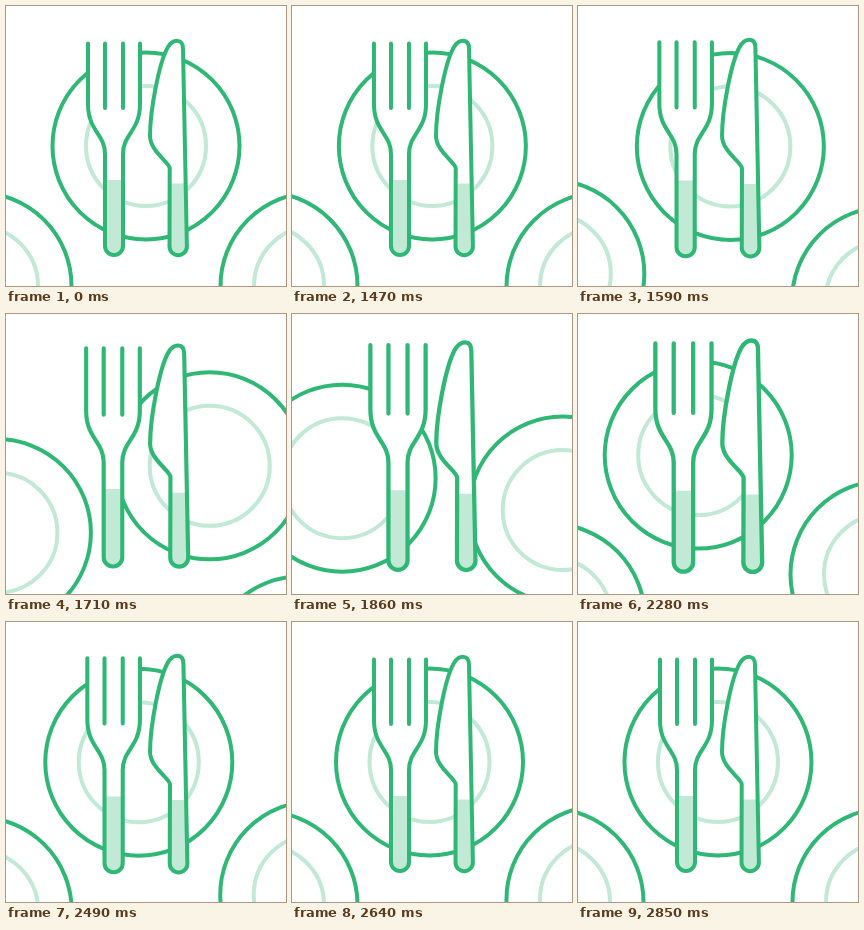
These frames come from a looping animation (280x280 px, 2.88 s). An HTML page:

```html
<!DOCTYPE html>
<html lang="en">
<head>
<meta charset="utf-8">
<title>Plates</title>
<style>
  html, body { margin: 0; width: 100%; height: 100%; overflow: hidden; background: #fff; }
  svg { display: block; width: 100vw; height: 100vh; }
  .line { fill: none; stroke: #2fb875; stroke-width: 4; stroke-linecap: round; stroke-linejoin: round; }
  .soft { fill: none; stroke: #c1e9d6; stroke-width: 4; }
  .tint { fill: #c1e9d6; }
  .body { fill: #fff; }
</style>
</head>
<body>
<svg viewBox="0 0 280 280">
  <defs>
    <path id="fork" d="M82 37.5V98C82 125 99 128 99 148V240a9 9 0 0 0 18 0V148C117 128 134 125 134 98V37.5"/>
    <path id="knife" d="M177 43C177 32 167 33 162 41C153 56 144 105 144 130C144 145 163 156 163.7 162L163.5 240.5a8.7 8.7 0 0 0 17.4 0Z"/>
    <g id="plate">
      <circle class="line" r="93.5"/>
      <circle class="soft" r="60"/>
    </g>
  </defs>
  <g id="plates"></g>
  <g id="cutlery">
    <use href="#fork" class="body"/>
    <path class="tint" d="M99 174h18V240a9 9 0 0 1 -18 0Z"/>
    <use href="#fork" class="line"/>
    <path class="line" d="M99 37.5V102M117 37.5V102"/>
    <use href="#knife" class="body"/>
    <path class="tint" d="M163.6 177.5h16L180.9 240.5a8.7 8.7 0 0 1 -17.4 0Z"/>
    <use href="#knife" class="line"/>
  </g>
</svg>
<script>
const NS = "http://www.w3.org/2000/svg";
const LOOP = 2880, START = 1440, PEAK = 2160, SETTLE = 2580;
const make = (tag, attrs) => {
  const el = document.createElementNS(NS, tag);
  for (const k in attrs) el.setAttribute(k, attrs[k]);
  return el;
};

// Cubic timing curve, solved by bisection
const bezier = (x1, y1, x2, y2) => x => {
  if (x <= 0) return 0;
  if (x >= 1) return 1;
  const at = (a, b, s) => 3 * s * (1 - s) * ((1 - s) * a + s * b) + s ** 3;
  let lo = 0, hi = 1;
  for (let i = 0; i < 30; i++) {
    const mid = (lo + hi) / 2;
    if (at(x1, x2, mid) < x) lo = mid; else hi = mid;
  }
  return at(y1, y2, lo);
};
const glide = bezier(1 / 3, 0, 0, 1);
const smooth = bezier(1 / 3, 0, 2 / 3, 1);

// Four legs of the closed track; each plate moves on by one leg per loop
const legs = [
  "M140 475C45 475 -28 385 -28 280",
  "M-28 280C-28 210 50 140 140 140",
  "M140 140C230 140 308 210 308 280",
  "M308 280C308 385 235 475 140 475"
].map(d => {
  const path = make("path", { d });
  const plate = make("use", { href: "#plate" });
  document.getElementById("plates").append(plate);
  return { path, plate, length: path.getTotalLength() };
});
const cutlery = document.getElementById("cutlery");

function draw(t) {
  const p = glide((t - START) / (LOOP - START));
  for (const { path, plate, length } of legs) {
    const { x, y } = path.getPointAtLength(p * length);
    plate.setAttribute("transform", `translate(${x} ${y})`);
  }
  const swell = smooth((t - START) / (PEAK - START)) - smooth((t - PEAK) / (SETTLE - PEAK));
  cutlery.setAttribute("transform",
    `translate(140 140) scale(${1 + 0.1 * swell}) translate(-140 -140)`);
}

function tick() {
  draw(performance.now() % LOOP);
  requestAnimationFrame(tick);
}
tick();
</script>
</body>
</html>
```
